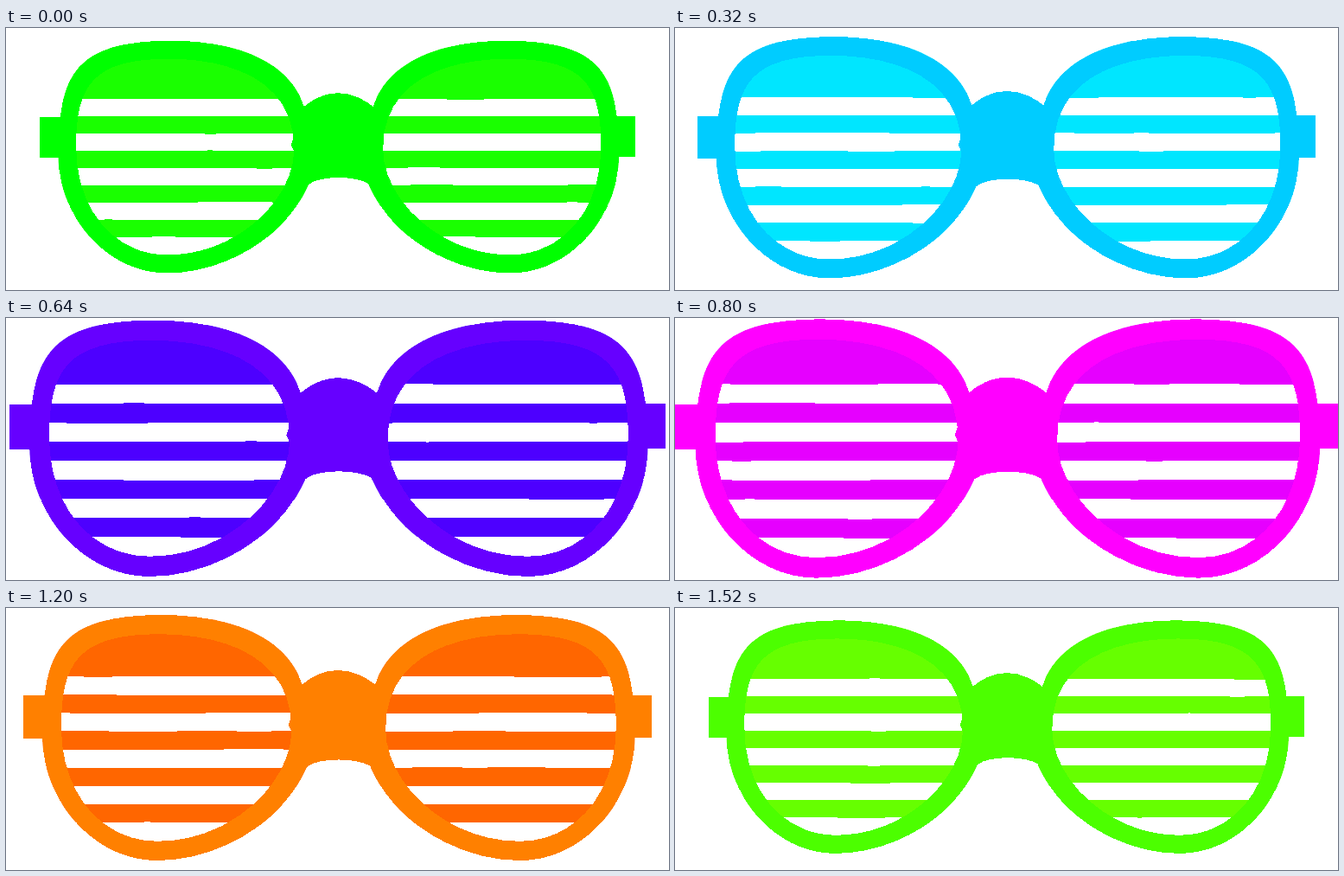
Write an HTML page that moves like this. It is 767x303 px and loops after 1600 ms.

```html
<!DOCTYPE html>
<html lang="en">
<head>
<meta charset="utf-8">
<title>Shutter shades</title>
<style>
html, body { margin: 0; width: 100%; height: 100%; overflow: hidden; background: #fff; }
svg { display: block; width: 767px; height: 303px; }
</style>
</head>
<body>
<svg viewBox="0 0 767 303" shape-rendering="crispEdges">
  <defs>
    <path id="rim" fill-rule="evenodd" d="
      M61.5 148C61.5 53 81 16 190 15C262 15 327 36 345 91L357 135L350 181
      C322 245 250 283 187 283C116 283 61.5 216 61.5 148Z
      M82 137C82 68 100 36 189 36C262 36 334 62 333.5 140
      C333.5 198 268 262 187 262C128 262 82 212 82 137Z"/>
    <clipPath id="lens"><use href="#rim"/><path d="
      M72 137C72 62 95 26 189 26C265 26 342 58 342 140
      C342 205 270 272 187 272C122 272 72 216 72 137Z"/></clipPath>
  </defs>
  <g id="glasses">
    <g id="slats">
      <path id="left" clip-path="url(#lens)"/>
      <path id="right" clip-path="url(#lens)" transform="matrix(-1 0 0 1 769.5 0)"/>
    </g>
    <g id="frame">
      <use href="#rim"/>
      <use href="#rim" transform="matrix(-1 0 0 1 769.5 0)"/>
      <path d="M345 91C353 84 367 75.3 384 75.3S416 84 424.5 91L428 135L419.5 180C411 175 398 173 385 173S357 175 350 181L330 135Z"/>
      <path d="M40.5 103H72V149.8H40.5ZM695 102.4H726.5V149H695Z"/>
    </g>
  </g>
</svg>
<script>
const STEP = 80, STEPS = 20;
const CX = 383.5, CY = 132;
const SLATS = 4, PITCH = 39.8, TOP = 82.3;
const X0 = 60, X1 = 350, PARTS = 5, WOBBLE = 0.6;
const $ = id => document.getElementById(id);

// Random numbers from -1 to 1
function seeded(n) {
  let s = n * 7919 + 13;
  return () => {
    s = (s * 1664525 + 1013904223) % 4294967296;
    return s / 2147483648 - 1;
  };
}

// Slightly uneven, hand-cut edge
function edge(y, rnd) {
  return Array.from({ length: PARTS + 1 }, (_, i) =>
    `${X0 + (X1 - X0) * i / PARTS} ${(y + rnd() * WOBBLE).toFixed(2)}`);
}

function strip(y0, y1, rnd) {
  return 'M' + edge(y0, rnd).concat(edge(y1, rnd).reverse()).join('L') + 'Z';
}

// Tinted top of the lens, then evenly spaced slats
function shutter(rnd) {
  let d = strip(20, TOP, rnd);
  for (let i = 0; i < SLATS; i++) {
    const y = TOP + PITCH * (i + 0.5);
    d += strip(y, y + PITCH / 2, rnd);
  }
  return d;
}

const hsl = hue => `hsl(${hue % 360}, 100%, 50%)`;

function draw(k) {
  const turn = k / STEPS;
  const scale = 1.06 - 0.057 * Math.cos(2 * Math.PI * turn);
  const hue = 120 + 360 * turn;
  const rnd = seeded(k + 1);
  $('glasses').setAttribute('transform',
    `translate(${CX} ${CY}) scale(${scale}) translate(${-CX} ${-CY})`);
  $('frame').setAttribute('fill', hsl(hue));
  $('slats').setAttribute('fill', hsl(hue - 6));
  $('left').setAttribute('d', shutter(rnd));
  $('right').setAttribute('d', shutter(rnd));
}

let start = null, shown = 0;
function tick(now) {
  if (start === null) start = now;
  const k = Math.floor((now - start) / STEP) % STEPS;
  if (k !== shown) draw(shown = k);
  requestAnimationFrame(tick);
}
draw(0);
requestAnimationFrame(tick);
</script>
</body>
</html>
```
